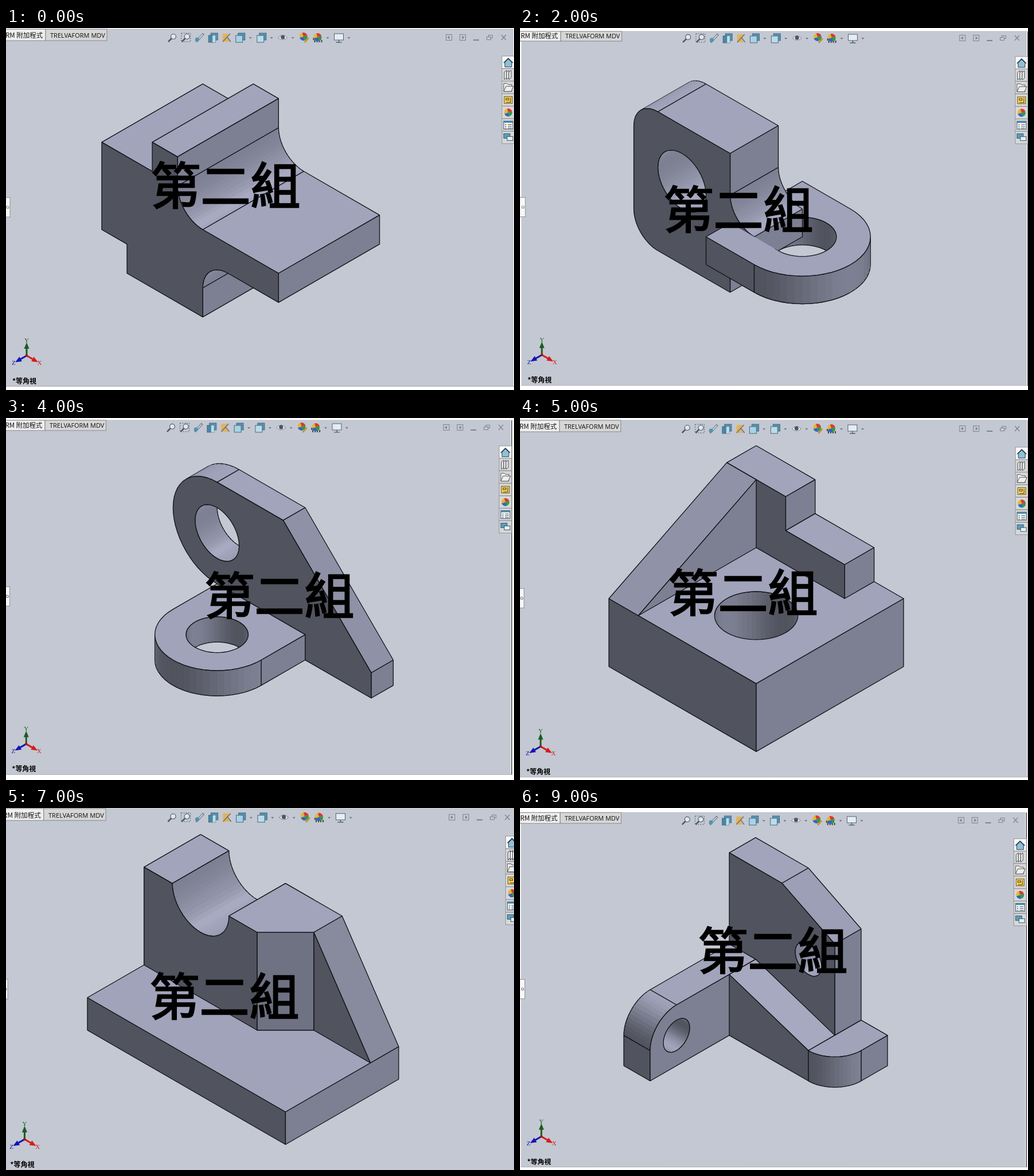
Write an HTML page with a canvas that moves like this. It is 886 px wide and 632 px high and loops after 10 s.

```html
<!DOCTYPE html>
<html lang="zh-Hant">
<head>
<meta charset="utf-8">
<style>
  html, body { margin: 0; width: 100%; height: 100%; overflow: hidden; background: #fff; }
  canvas { display: block; }
</style>
</head>
<body>
<canvas id="stage" width="886" height="632"></canvas>
<script>
const ctx = document.getElementById('stage').getContext('2d');
const CJK = '"Noto Sans CJK TC", "Noto Sans CJK", "Noto Sans CJK JP", sans-serif';
const BACK = '#c4c8d2', INK = '#101014';

// ---- isometric solids: axis 0 runs right-down, axis 1 right-up, axis 2 up ----
const SIDE = 0, FRONT = 1, TOP = 2;
const VIEW = [1, -1, 1];
const TINT = [[125, 128, 146], [81, 83, 94], [160, 163, 186]];
const GLOSS = [.26, 0, .966];
const ARC_STEPS = 14;
let iso;

const dot = (u, v) => u.reduce((sum, value, i) => sum + value * v[i], 0);
const project = ([a, b, c]) =>
  [iso.x + iso.s * (a + b), iso.y + iso.s * (a - b - 2 * c) / Math.sqrt(3)];

function shade(normal) {
  const length = Math.hypot(...normal), n = normal.map(v => v / length);
  const gloss = 10 * Math.max(0, dot(n, GLOSS)) ** 60;
  return `rgb(${[0, 1, 2].map(ch => n.reduce((sum, v, k) => sum + v * v * TINT[k][ch], gloss))})`;
}

function trace(points, closed = true) {
  points.forEach((p, i) => i ? ctx.lineTo(...project(p)) : ctx.moveTo(...project(p)));
  if (closed) ctx.closePath();
}

function ink(draw, fill) {
  ctx.beginPath();
  draw();
  if (fill) { ctx.fillStyle = fill; ctx.fill('evenodd'); }
  ctx.strokeStyle = INK;
  ctx.lineWidth = 1.3;
  ctx.lineJoin = 'round';
  ctx.stroke();
}

const facet = (fill, ...points) => ink(() => trace(points), fill);

// Corners are [x, y, radius]; rounded ones become short curved segments.
function roundCorners(corners) {
  const count = corners.length;
  const toward = (p, q) => {
    const d = Math.hypot(q[0] - p[0], q[1] - p[1]);
    return [(q[0] - p[0]) / d, (q[1] - p[1]) / d];
  };
  const points = corners.flatMap((corner, i) => {
    const [x, y, r] = corner;
    if (!r) return { p: [x, y], curved: false };
    const into = toward(corners[(i + count - 1) % count], corner);
    const out = toward(corner, corners[(i + 1) % count]);
    return Array.from({ length: ARC_STEPS + 1 }, (_, j) => {
      const t = j / ARC_STEPS * Math.PI / 2;
      const p = [0, 1].map(k => corner[k] + r * (into[k] * (Math.sin(t) - 1) + out[k] * (1 - Math.cos(t))));
      return { p, curved: j < ARC_STEPS };
    });
  });
  return points.filter(({ p }, i) => {
    const next = points[(i + 1) % points.length].p;
    return Math.hypot(next[0] - p[0], next[1] - p[1]) > 1e-6;
  });
}

const circle = (x, y, r) => [[x - r, y - r, r], [x + r, y - r, r], [x + r, y + r, r], [x - r, y + r, r]];

// Extrudes an outline away from the viewer and paints its visible walls, then its cap.
function prism(axis, level, depth, outline, ...holes) {
  const lift = (p, d) => [...p.slice(0, axis), d, ...p.slice(axis)];
  const back = level - VIEW[axis] * depth;
  const loops = [outline, ...holes].map(roundCorners);

  const walls = loops.flatMap((loop, index) => {
    const size = loop.length;
    const area = loop.reduce((sum, { p }, i) => {
      const q = loop[(i + 1) % size].p;
      return sum + p[0] * q[1] - q[0] * p[1];
    }, 0);
    const facing = Math.sign(area) * (index ? -1 : 1);
    const segments = loop.map(({ p, curved }, i) => {
      const q = loop[(i + 1) % size].p;
      const normal = lift([(q[1] - p[1]) * facing, (p[0] - q[0]) * facing], 0);
      return { p, q, curved, normal, visible: dot(normal, VIEW) > 1e-6 };
    });
    const crease = (s, t) => !(s.curved && t.curved) || s.visible !== t.visible;
    segments.forEach((s, i) => {
      s.startEdge = crease(segments[(i + size - 1) % size], s);
      s.endEdge = crease(s, segments[(i + 1) % size]);
      s.near = dot(lift([(s.p[0] + s.q[0]) / 2, (s.p[1] + s.q[1]) / 2], level), VIEW);
    });
    return segments.filter(s => s.visible);
  });

  walls.sort((s, t) => s.near - t.near).forEach(s => {
    const [p, q, q2, p2] = [lift(s.p, level), lift(s.q, level), lift(s.q, back), lift(s.p, back)];
    ctx.fillStyle = ctx.strokeStyle = shade(s.normal);
    ctx.lineWidth = .8;
    ctx.beginPath();
    trace([p, q, q2, p2]);
    ctx.fill();
    if (s.curved) ctx.stroke();
    ink(() => {
      trace([p, q], false);
      trace([p2, q2], false);
      if (s.startEdge) trace([p, p2], false);
      if (s.endEdge) trace([q, q2], false);
    });
  });
  ink(() => loops.forEach(loop => trace(loop.map(({ p }) => lift(p, level)))), `rgb(${TINT[axis]})`);
}

// ---- machine parts ----
const part = (x, y, s, build) => () => { iso = { x, y, s }; build(); };

const steppedBlock = part(167, 352, 44.05, () =>
  prism(FRONT, 0, 4, [[0, 0], [0, 3], [2, 3], [2, 4], [3, 4], [3, 2, 1], [7, 2], [7, 1],
    [4, 1, 1], [4, -1], [1, -1], [1, 0]]));

const roundedBracket = part(198.5, 364.5, 42, () => {
  const plate = () => prism(TOP, 2.5, 1, [[4, -1], [4, 3], [8, 3, 2], [8, -1, 2]], circle(6, 1, 1));
  plate();
  prism(FRONT, 0, 2, [[0, 0, 1], [0, 5, 1], [4, 5], [4, 2.5, 1], [5, 2.5], [5, 1.5], [4, 1.5], [4, 0]],
    circle(2, 3, 1));
  // the plate also reaches forward past the upright
  ctx.save();
  ctx.beginPath();
  trace([[0, 0, 2.5], [9, 0, 2.5], [9, 0, -9], [0, 0, -9]]);
  ctx.clip();
  plate();
  ctx.restore();
});

const notchedCube = part(166, 423, 54.3, () => {
  const left = [1, 0, 4], inner = [2, 2, 4], right = [5, 3, 4], low = [5, 0, 1];
  facet(shade([0, 0, 1]), [0, 0, 4], [0, 4, 4], [5, 4, 4], right, inner, left);
  facet(shade([0, 1, 0]), [0, 0, 4], left, low, [5, 0, 0], [0, 0, 0]);
  facet(shade([1, 0, 0]), right, [5, 4, 4], [5, 4, 0], [5, 0, 0], low);
  facet('#a3a6bc', left, inner, low);
  facet(shade([1, -3, 3]), inner, right, low);
});

const angledLug = part(291.4, 289.5, 38.4, () => {
  prism(FRONT, 0, 1, [[9, 0], [5, 0], [5, 1], [0, 1, 2], [0, 5, 2], [5, 5], [9, 1]], circle(2, 3, 1));
  prism(TOP, 1, 1, [[2, 0], [6, 0], [6, -4, 2], [2, -4, 2]], circle(4, -2, 1));
});

const ribbedBase = part(155, 434, 51.4, () => {
  prism(TOP, 2, 2, [[0, 0], [5, 0], [5, 5], [0, 5]], circle(3, 2, 1));
  prism(FRONT, 4, 1, [[0, 2], [0, 4], [2, 4], [2, 3], [4, 3], [4, 2]]);
  prism(SIDE, 1, 1, [[0, 2], [4, 4], [4, 2]]);
});

const cradle = part(142, 388, 49.35, () => {
  prism(TOP, 1, 1, [[0, 0], [7, 0], [7, 4], [0, 4]]);
  prism(FRONT, 2, 2, [[0, 1], [0, 4], [1, 4], [1, 3, 1], [3, 3, 1], [3, 4], [4, 4], [4, 1]]);
  prism(FRONT, 3, 1, [[5, 1], [5, 4], [7, 1]]);
  facet(shade([0, 0, 1]), [3, 2, 4], [3, 4, 4], [5, 4, 4], [5, 3, 4], [4, 2, 4]);
  facet('#6f7283', [4, 2, 4], [5, 3, 4], [5, 3, 1], [4, 2, 1]);
});

const crossBracket = part(181, 450, 46, () => {
  prism(FRONT, 4, 1, [[0, 1], [0, 5], [2, 5], [4, 4], [4, 1]], circle(3, 3, .5));
  prism(SIDE, 1, 1, [[0, 0], [0, 2, 1], [4, 2], [4, 0]], circle(1, 1, .5));
  prism(FRONT, 3, 1, [[1, 0], [1, 2], [4, 1], [4, 0]]);
  prism(TOP, 1, 1, [[4, 3], [4, 5], [5, 5], [5, 3, 1]]);
});

// ---- window furniture ----
function at(x, y, draw) {
  ctx.save();
  ctx.translate(x, y);
  draw();
  ctx.restore();
}

function line(d, color, width = 1) {
  ctx.strokeStyle = color;
  ctx.lineWidth = width;
  ctx.stroke(new Path2D(d));
}

function shape(d, fill, stroke) {
  ctx.fillStyle = fill;
  ctx.fill(new Path2D(d));
  if (stroke) line(d, stroke);
}

function box(x, y, w, h, fill, stroke) {
  ctx.lineWidth = 1;
  if (fill) { ctx.fillStyle = fill; ctx.fillRect(x, y, w, h); }
  if (stroke) { ctx.strokeStyle = stroke; ctx.strokeRect(x, y, w, h); }
}

function disc(x, y, r, fill, stroke = fill) {
  ctx.beginPath();
  ctx.arc(x, y, r, 0, 7);
  ctx.fillStyle = fill;
  ctx.fill();
  ctx.strokeStyle = stroke;
  ctx.lineWidth = 1.2;
  ctx.stroke();
}

function text(s, x, y, font, color = '#111', align = 'left') {
  ctx.font = font;
  ctx.fillStyle = color;
  ctx.textAlign = align;
  ctx.fillText(s, x, y);
}

function magnifier() {
  line('M-7,7L-1,1', '#4c5663', 2.5);
  disc(2, -2, 4.5, '#dce8f2', '#53616e');
}

function zoomArea() {
  ctx.setLineDash([2, 2]);
  box(-8, -8, 16, 15, null, '#53616e');
  ctx.setLineDash([]);
  magnifier();
}

function previousView() {
  line('M-6,7L7,-7', '#66737f', 4);
  line('M-5,6L6,-6', '#c4dae6', 2);
  disc(-4, 3, 3, '#5692b4');
}

function cube(front = '#a8d2e5') {
  box(-4, -8, 12, 12, '#5692b4', '#47697c');
  box(-8, -4, 12, 12, front, '#47697c');
}

function section() {
  cube('#4687a8');
  box(-1, -4, 5, 12, '#c0dbe6');
}

function sketch() {
  shape('M-7,-7H5L0,0 6,7H-7Z', '#e3b25a');
  line('M-7,7L6,-7M0,-2L7,7', '#66737f', 1.5);
}

function eye() {
  shape('M-8,0Q0,-9 8,0Q0,7 -8,0Z', '#e9edf0', '#7b858f');
  disc(0, -1, 3, '#4a5661');
}

function ball(r = 7) {
  ['#2f9a45', '#2f66c0', '#e5b72d', '#d73a32'].forEach((color, i) => {
    ctx.fillStyle = color;
    ctx.beginPath();
    ctx.moveTo(0, 0);
    ctx.arc(0, 0, r, i * Math.PI / 2 - .3, (i + 1) * Math.PI / 2 - .3);
    ctx.fill();
  });
}

function paintBall() {
  at(-1, -2, ball);
  line('M1,8L8,0', '#c89231', 3);
}

function scene() {
  for (let i = 0; i < 8; i++) box(-8 + i * 2, i % 2 * 4, 2, 4, '#444');
  at(0, -1, ball);
}

function monitor() {
  box(-8, -7, 16, 11, '#e3edf4', '#56616c');
  line('M0,4V8M-5,8H5', '#56616c', 1.5);
}

function home() {
  shape('M-6,0L0,-6 6,0V8H-6Z', '#8fc0d8', '#263b49');
  line('M-8,1L0,-7 8,1', '#263b49', 1.5);
}

function books() {
  for (const x of [-7, -3, 1]) shape(`M${x},-5l4,-3V5l-4,3Z`, '#eee', '#454b52');
}

function folder() {
  shape('M-8,7V-7H-2L0,-5H6V7Z', '#eee', '#555');
  shape('M-8,7L-4,-2H9L5,7Z', '#eee', '#555');
}

function palette() {
  box(-7, -6, 14, 12, '#f4d469', '#6b5313');
  box(-4, -3, 5, 3, null, '#49370a');
  line('M4,-4V4H-4', '#49370a');
}

function properties() {
  box(-8, -7, 16, 14, '#fff', '#344c5d');
  box(-8, -7, 16, 3, '#4c8cac');
  for (const y of [-1, 2, 5]) line(`M-6,${y}h3m2,0h7`, '#344c5d');
}

function chat() {
  box(-8, -7, 11, 8, '#5b9dbd', '#36596c');
  box(-2, -2, 10, 7, '#e5f0f5', '#36596c');
}

function toolbar() {
  const withMenu = [cube, section, eye, scene, monitor];
  const icons = [magnifier, zoomArea, previousView, section, sketch, cube, () => cube('#bcdbe8'), eye, paintBall, scene, monitor];
  const menus = new Set([5, 6, 7, 9, 10]);
  let x = 290;
  icons.forEach((icon, i) => {
    at(x, 17, () => icon());
    if (menus.has(i)) shape(`M${x + 15},16h5l-2.5,3Z`, '#737984');
    x += menus.has(i) ? 37 : 23.75;
  });

  const gray = '#7c838e';
  for (const side of [-1, 1]) at(784.5 + side * 12, 16.5, () => {
    box(-5, -5, 10, 10, null, gray);
    shape(`M${side * 3},0L${-side},-3V3Z`, gray);
  });
  line('M815,21h10', gray, 2);
  box(841.5, 12.5, 7, 5, null, gray);
  box(838.5, 15.5, 7, 5, BACK, gray);
  line('M864,12l8,9m0,-9l-8,9', gray, 1.3);
}

function dock() {
  [home, books, folder, palette, ball, properties, chat].forEach((icon, i) => {
    const y = 60 + i * 21.9;
    box(865, y - 11, 22, 21.5, i ? '#d8d8d8' : '#fafafa', '#92959b');
    at(876, y, () => icon());
  });
}

function triad() {
  ['X', 'Z', 'Y'].forEach((label, i) => {
    const color = ['#d51c1c', '#1414b4', '#195d20'][i];
    at(36, 572, () => {
      const angle = (30 + i * 120) * Math.PI / 180;
      ctx.rotate(angle);
      line('M0,0H14', color, 3);
      shape('M23,0L12,-4.5V4.5Z', color);
      ctx.rotate(-angle);
      text(label, 26 * Math.cos(angle), 26 * Math.sin(angle) + 3, '11px "Liberation Serif", serif', color, 'center');
    });
  });
  disc(36, 572, 1.5, '#a31616');
}

function windowFrame({ x, y, scale, top }) {
  ctx.fillStyle = '#fff';
  ctx.fillRect(0, 0, 886, 632);
  ctx.save();
  ctx.translate(x, y);
  ctx.scale(scale, scale);
  const edge = (top - y) / scale;
  box(0, edge, 885, 625 - edge, BACK);
  line('M0,625.5H886', '#a0a3a9');
  line(`M887,${edge}V626`, '#3c3e44', 1.5);
  line(`M0,${edge}H885`, '#b5b8be');
  box(-8, edge, 77, 22 - edge, '#efefef', '#85888e');
  box(69, edge, 107, 22 - edge, '#d6d6d7', '#85888e');
  text('RM 附加程式', -1, 17, '11.5px ' + CJK);
  text('TRELVAFORM MDV', 77, 17, '11px "Open Sans", sans-serif');
  box(-3, 296, 10, 34, '#f7f7f7', '#8b8e95');
  disc(3, 313, 2, '#fff', '#85888e');
  toolbar();
  dock();
  triad();
  text('*等角視', 11, 620.5, 'bold 12px ' + CJK, '#000');
  ctx.restore();
}

function ribbonEdge() {
  line('M283,0V3M391,0V3M438,0V3', '#aaa');
  box(485, -1, 54, 4, '#aaa', '#777');
}

function title(x, y) {
  text('第二組', x, y + 31, '87px ' + CJK, '#000', 'center');
  ctx.strokeStyle = '#000';
  ctx.lineWidth = 2.6;
  ctx.lineJoin = 'miter';
  ctx.strokeText('第二組', x, y + 31);
}

// ---- slide show ----
const view = (x, y, scale, top) => ({ x, y, scale, top });
const slide = (build, titleX, titleY, frame, extra) => ({ build, titleX, titleY, frame, extra });

const cubeView = view(2.3, 1, .996, 6);
const base = slide(ribbedBase, 389, 307, view(0, 2, .999, 4));
const saddle = slide(cradle, 381, 331, view(-4, -.5, 1.012, 1));
const slides = [
  slide(steppedBlock, 383, 277, view(0, 0, 1, 2)),
  slide(roundedBracket, 381, 319, view(.2, 3.3, .9975, 6), ribbonEdge),
  slide(roundedBracket, 381, 319, cubeView),
  slide(notchedCube, 374, 265, cubeView),
  slide(angledLug, 477, 312, view(-.6, 0, .995, 4)),
  base, base,
  saddle, saddle,
  slide(crossBracket, 441, 251, view(1.5, 5, .994, 8)),
];

function render(now) {
  const current = slides[Math.floor(now / 1000) % slides.length];
  windowFrame(current.frame);
  if (current.extra) current.extra();
  current.build();
  title(current.titleX, current.titleY);
  requestAnimationFrame(render);
}
requestAnimationFrame(render);
</script>
</body>
</html>
```
